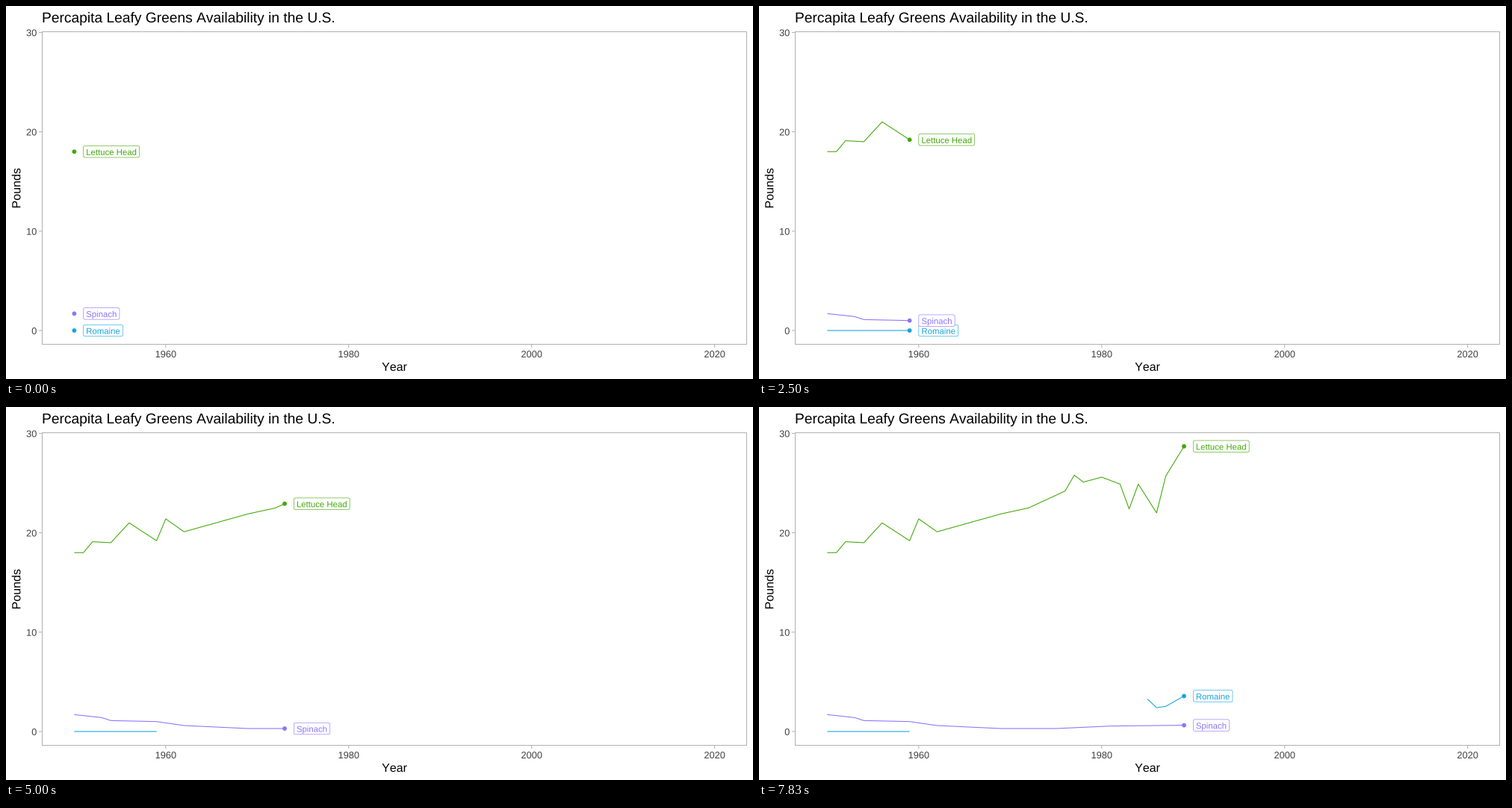
A matplotlib script that plays this animation: 1000 by 500 pixels, repeating every 8000 ms.

```python
import numpy as np
import matplotlib.pyplot as plt
from matplotlib.animation import FuncAnimation
from matplotlib.patches import Circle, FancyBboxPatch, PathPatch, Rectangle
from matplotlib.path import Path
from matplotlib.textpath import TextPath
from matplotlib.transforms import Affine2D

plt.rcParams["path.snap"] = False

W, H, DPI = 1000, 500, 100
PX = 72 / DPI  # one pixel in points
LOOP_MS, TICK_MS = 8000, 20
STEPS_PER_S, START_PAUSE = 6, 5
FONT = {"family": "Liberation Sans"}
GREY, TICK_TEXT = "#b0b0b0", "#404040"
PAD, LABEL_H, LABEL_SIZE = 3.6, 15.5, 11.38

# Each year lands on a whole step: 69 years spread over 74 steps.
YEARS = np.arange(40)
YEAR_STEPS = np.round(YEARS * 74 / 69)


def trend(*keys):
    """Yearly values along straight runs between (year, pounds) key points."""
    return np.interp(YEARS, *zip(*keys))


lettuce = trend((0, 18), (1, 18), (2, 19.1), (4, 19), (6, 21), (9, 19.2), (10, 21.4),
                (12, 20.1), (19, 21.9), (22, 22.5), (26, 24.2), (27, 25.8), (28, 25.1),
                (30, 25.6), (32, 24.9), (33, 22.4), (34, 24.9), (36, 22), (37, 25.7),
                (39, 28.7))
spinach = trend((0, 1.7), (3, 1.4), (4, 1.1), (9, 1), (12, 0.6), (19, 0.3), (25, 0.3),
                (31, 0.55), (39, 0.63))
romaine = trend((0, 0), (9, 0), (35, 3.27), (36, 2.4), (37, 2.53), (39, 3.57))
romaine[10:35] = np.nan  # no records for these years


def px_x(year):
    """Years since 1950 to pixels."""
    return 91.36 + 12.247 * np.asarray(year)


def px_y(pounds):
    return 435 - 13.32 * np.asarray(pounds)


fig = plt.figure(figsize=(W / DPI, H / DPI), dpi=DPI, facecolor="white")
ax = fig.add_axes([0, 0, 1, 1])
ax.set_xlim(0, W)
ax.set_ylim(H, 0)
ax.axis("off")


def place(x, y, angle=0):
    return Affine2D().scale(1, -1).rotate_deg(angle).translate(x, y) + ax.transData


def glyph_run(s, size):
    """Outline of s set without kerning, and its advance width."""
    def width(t):
        return TextPath((0, 0), t, size=size, prop=FONT).get_extents().width

    x, glyphs = 0, []
    for c in s:
        if c != " ":
            glyphs.append(TextPath((x, 0), c, size=size, prop=FONT))
        x += width(f"|{c}|") - width("||")
    return Path.make_compound_path(*glyphs), x


def add_text(s, x, y, size, color="black", align=0.0, angle=0, zorder=1):
    """Text on baseline y; align 0, 0.5 or 1 for left, centre or right."""
    path, width = glyph_run(s, size)
    path = path.transformed(Affine2D().translate(-align * width, 0))
    patch = PathPatch(path, fc=color, lw=0, transform=place(x, y, angle), zorder=zorder)
    ax.add_artist(patch)
    return patch, width


def add_tick(xs, ys):
    ax.plot(xs, ys, color=GREY, lw=PX, solid_capstyle="butt")


ax.add_patch(Rectangle((48.5, 34.5), 943, 419, fill=False, ec=GREY, lw=PX))
for year in range(1960, 2021, 20):
    x = px_x(year - 1950)
    add_tick([x, x], [454, 458])
    add_text(str(year), x, 471, 12.8, TICK_TEXT, 0.5)
for pounds in range(0, 31, 10):
    y = px_y(pounds)
    add_tick([44, 48], [y, y])
    add_text(str(pounds), 41.3, y + 4.9, 12.8, TICK_TEXT, 1)
add_text("Percapita Leafy Greens Availability in the U.S.", 48, 22, 19.2)
add_text("Year", 520, 489, 16, align=0.5)
add_text("Pounds", 19.3, 244.3, 16, align=0.5, angle=-90)


class Series:
    def __init__(self, name, values, color, order):
        self.values = values
        self.line, = ax.plot([], [], color=color, lw=1.07 * PX,
                             solid_capstyle="butt", zorder=2)
        self.dot = ax.add_patch(Circle((0, 0), 2.9, fc=color, lw=0, zorder=3))
        z = 4 + 2 * order
        self.text, width = add_text(name, 0, 0, LABEL_SIZE, color, zorder=z + 1)
        self.box = ax.add_patch(FancyBboxPatch(
            (0, 0), width + 2 * PAD, LABEL_H, boxstyle="round,pad=0,rounding_size=2.2",
            fc="white", ec=color, lw=0.6 * PX, zorder=z))

    def show(self, t):
        i, j = int(np.floor(t)), int(np.ceil(t))
        head = self.values[i] + (self.values[j] - self.values[i]) * (t - i)
        self.line.set_data(px_x(np.append(YEARS[:i + 1], t)),
                           px_y(np.append(self.values[:i + 1], head)))
        visible = not np.isnan(head)
        for part in (self.dot, self.box, self.text):
            part.set_visible(visible)
        if visible:
            y, left = px_y(head), px_x(t + 1)
            self.dot.center = px_x(t), y
            self.box.set_x(left)
            self.box.set_y(y - LABEL_H / 2)
            self.text.set_transform(place(left + PAD, y + 4.6))


series = [Series("Lettuce Head", lettuce, "#42a808", 0),
          Series("Romaine", romaine, "#16a4e0", 1),
          Series("Spinach", spinach, "#8e73ff", 2)]


def update(frame):
    # The lead makes a step start on the tick just before its exact time.
    ms = frame * TICK_MS + 0.75 * TICK_MS
    step = int(ms * STEPS_PER_S / 1000)
    t = np.interp(max(step - START_PAUSE, 0), YEAR_STEPS, YEARS)
    for s in series:
        s.show(t)
    return []


anim = FuncAnimation(fig, update, frames=LOOP_MS // TICK_MS,
                     init_func=lambda: update(0), interval=TICK_MS,
                     repeat=True, repeat_delay=0)
plt.show()
```
